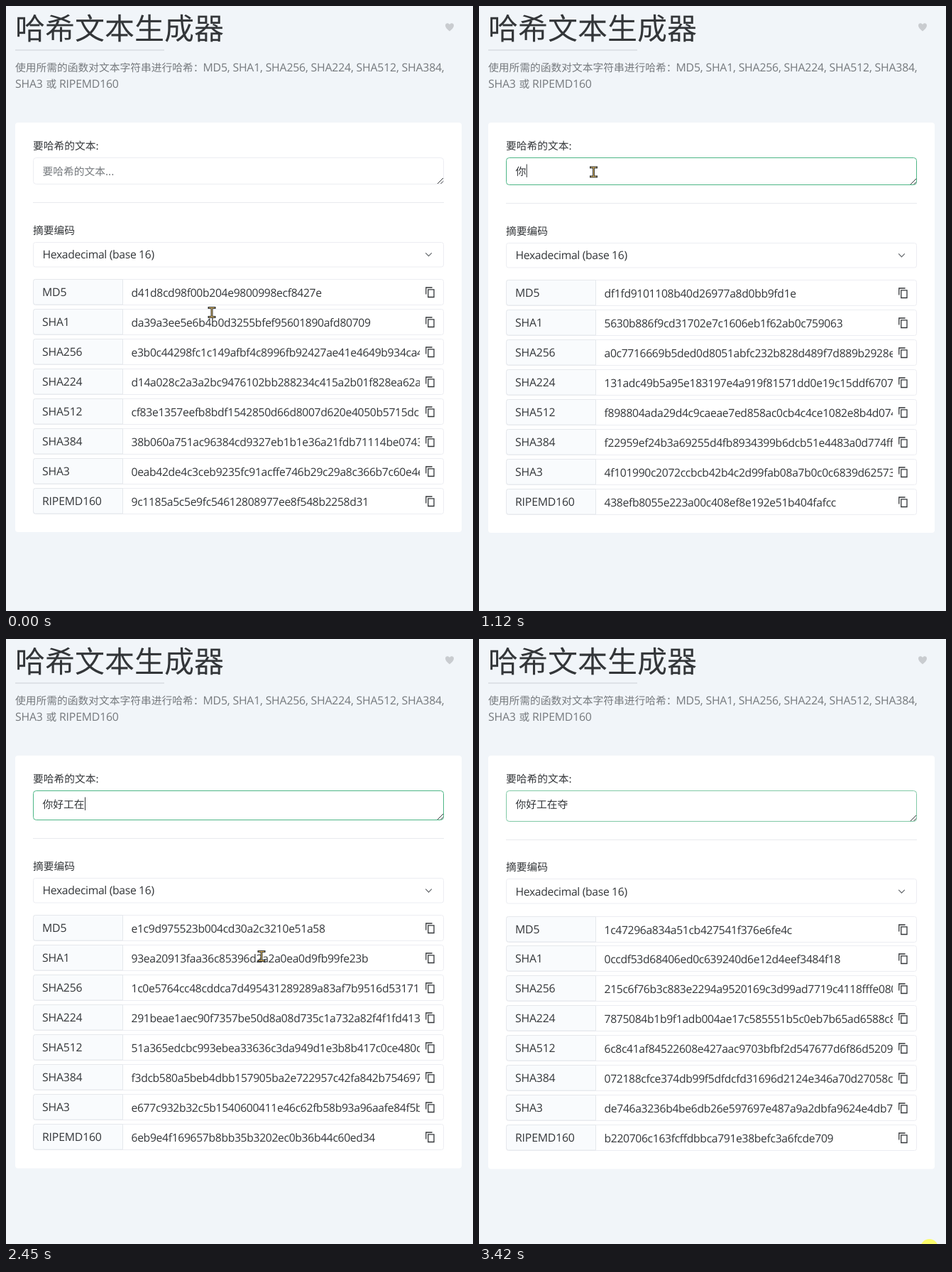
Recreate the animation shown at these times as an HTML page. Size 658x851 px, loop 3.46 s.

```html
<!DOCTYPE html>
<html lang="zh-CN">
<head>
<meta charset="utf-8">
<style>
html, body { margin: 0; width: 100%; height: 100%; overflow: hidden; background: #f1f5f9; }
svg { display: block; width: 658px; height: 851px; }
text { font: 15.7px "Open Sans", "Noto Sans", sans-serif; letter-spacing: -.33px; fill: #333639; white-space: pre; text-rendering: geometricPrecision; }
.caps { font-size: 15.8px; letter-spacing: -.18px; }
.cjk { font: 14.75px "Noto Sans CJK SC", "Noto Sans CJK", sans-serif; letter-spacing: 0; }
.title { font: 300 42px "Noto Sans CJK SC", "Noto Sans CJK", sans-serif; letter-spacing: 0; }
.grey { fill: #75797d; }
.line { fill: none; stroke: #333639; }
</style>
</head>
<body>
<svg id="stage" viewBox="0 0 658 851"></svg>
<script>
const LOOP = 3460;
const names = ['MD5', 'SHA1', 'SHA256', 'SHA224', 'SHA512', 'SHA384', 'SHA3', 'RIPEMD160'];
const typed = '你好工在夺';
const commits = [1120, 1660, 2120, 2440, 3280];

// Visible digests after 0 to 5 typed characters
const digests = [
  `d41d8cd98f00b204e9800998ecf8427e
   da39a3ee5e6b4b0d3255bfef95601890afd80709
   e3b0c44298fc1c149afbf4c8996fb92427ae41e4649b934ca4
   d14a028c2a3a2bc9476102bb288234c415a2b01f828ea62a
   cf83e1357eefb8bdf1542850d66d8007d620e4050b5715dc
   38b060a751ac96384cd9327eb1b1e36a21fdb71114be0743
   0eab42de4c3ceb9235fc91acffe746b29c29a8c366b7c60e4e
   9c1185a5c5e9fc54612808977ee8f548b2258d31`,
  `df1fd9101108b40d26977a8d0bb9fd1e
   5630b886f9cd31702e7c1606eb1f62ab0c759063
   a0c7716669b5ded0d8051abfc232b828d489f7d889b2928e
   131adc49b5a95e183197e4a919f81571dd0e19c15ddf6707
   f898804ada29d4c9caeae7ed858ac0cb4c4ce1082e8b4d074
   f22959ef24b3a69255d4fb8934399b6dcb51e4483a0d774ff
   4f101990c2072ccbcb42b4c2d99fab08a7b0c0c6839d62573
   438efb8055e223a00c408ef8e192e51b404fafcc`,
  `7eca689f0d3389d9dea66ae112e5cfd7
   440ee0853ad1e99f962b63e459ef992d7c211722
   670d9743542cae3ea7ebe36af56bd53648b0a1126162e78c
   e91f006ed4e0882de2f6a3c96ec228a6a5c715f356d00091b
   5232181bc0d9888f5c9746e410b4740eb461706ba5dacfbc
   05f076c7d180e91d80a56d70b226fca01e2353554c315ac1e
   690e4aec9334fc7c8bb0cdd203d0d132918088a02e8df882
   63b2385b306e6c9c96050aa08846471a90abb749`,
  `f535798baef7403816edcf6a75a1c368
   63c636553060fc40e66346e4f53af457e2489646
   d31594e5efad58231439e89faf68c684c4034caa0d85bd8e2
   9dc6aba08d4a502cdd9d6f870af054c441032a82e7f4f40b6
   c8943a4629908376aed21513008064d94c444b578fc93fd76
   34dbf25aeb6221364b9f78efbc9407dbb84e59c1e5e4e4407
   7611de69408d2b23a0242aaccf3fa45b2f14d73edd642f1d0
   77acb5efcda0a9d20a869eaef44cb993bc28d9fe`,
  `e1c9d975523b004cd30a2c3210e51a58
   93ea20913faa36c85396d2a2a0ea0d9fb99fe23b
   1c0e5764cc48cddca7d495431289289a83af7b9516d53171
   291beae1aec90f7357be50d8a08d735c1a732a82f4f1fd413
   51a365edcbc993ebea33636c3da949d1e3b8b417c0ce480c
   f3dcb580a5beb4dbb157905ba2e722957c42fa842b754697
   e677c932b32c5b1540600411e46c62fb58b93a96aafe84f5b
   6eb9e4f169657b8bb35b3202ec0b36b44c60ed34`,
  `1c47296a834a51cb427541f376e6fe4c
   0ccdf53d68406ed0c639240d6e12d4eef3484f18
   215c6f76b3c883e2294a9520169c3d99ad7719c4118fffe080
   7875084b1b9f1adb004ae17c585551b5c0eb7b65ad6588c8
   6c8c41af84522608e427aac9703bfbf2d547677d6f86d5209
   072188cfce374db99f5dfdcfd31696d2124e346a70d27058c
   de746a3236b4be6db26e597697e487a9a2dbfa9624e4db79
   b220706c163fcffdbbca791e38befc3a6fcde709`
].map(s => s.split(/\s+/));

// Input method window: start, end, right edge, pinyin, candidates
const popups = [
  [910, 1120, 366, 'ni', '你呢拟尼泥'],
  [1350, 1510, 356, 'h', '好和会还很'],
  [1510, 1660, 399, 'hao', '好号浩毫豪'],
  [1980, 2120, 453, 'gong', '工公共功宫'],
  [2240, 2440, 440, 'zai', '在再载灾仔'],
  [2980, 3280, 450, 'duo', '多夺朵躲堕']
];

// Pointer positions, each held until the next: time, x, y
const moves = [
  [0, 290, 431], [70, 284, 420], [145, 262, 386], [220, 228, 338], [295, 195, 286],
  [370, 172, 248], [445, 161.5, 233.5], [2300, 190, 262], [2370, 262, 338],
  [2440, 360, 446], [2500, 458, 556], [2560, 540, 640], [2620, 592, 694],
  [2700, 628, 738], [2760, 644, 759], [2820, 645, 790], [2900, 640, 826], [2980, 635, 857]
];

const snap = y => Math.floor(y) + .5;
const text = (x, y, s, cls = '') => `<text x="${x}" y="${y}" class="${cls}">${s}</text>`;
const box = (x, y, w, h, fill = '#fff', stroke = '#ecedf2', r = 3) =>
  `<rect x="${x}" y="${y}" width="${w}" height="${h}" rx="${r}" fill="${fill}" stroke="${stroke}"/>`;
const path = (d, w = 1.2, extra = '') => `<path class="line" d="${d}" stroke-width="${w}" ${extra}/>`;
const dot = (x, y) => `<circle cx="${x}" cy="${y}" r="12.5" fill="#ffff3c" fill-opacity=".75"/>`;

const header =
  text(13, 47, '哈希文本生成器', 'title') +
  '<path d="M13 62H223" stroke="#d9dde2" stroke-width="1.5"/>' +
  '<path d="M625 35.5C621 32 619 30 619 27.4C619 23.8 623.2 23 625 26C626.8 23 631 23.8 631 27.4C631 30 629 32 625 35.5Z" fill="#c9ccd0"/>' +
  text(13, 91.5, '使用所需的函数对文本字符串进行哈希：', 'cjk grey') +
  text(277.5, 91.5, names.slice(0, 6).join(', ') + ',', 'caps grey') +
  text(13, 115, 'SHA3', 'caps grey') + text(56.5, 115, '或', 'cjk grey') +
  text(75, 115, 'RIPEMD160', 'caps grey') +
  '<clipPath id="field"><path d="M170 370H583V740H170Z"/></clipPath>';

function row(name, digest, y) {
  return box(38.5, y, 578, 36) +
    `<path d="M164.5 ${y}H41.5a3 3 0 0 0-3 3v29.5a3 3 0 0 0 3 3H164.5Z" fill="#f9fbfd" stroke="#e5e8ec"/>` +
    text(51, y + 23, name, 'caps') +
    `<g clip-path="url(#field)">${text(176.5, y + 24, digest)}</g>` +
    path(`M591.8 ${y + 21}v-9.5h8.8M594.8 ${y + 14.3}h8.2v10.7h-8.2Z`, 1.3);
}

function popup([, , right, pinyin, words], x) {
  const list = [...words].map((w, i) => `${i + 1}.${w}`).join('  ');
  return box(x + .5, 242.5, right - x - 1, 49, '#fff', '#d5d8dc', 2) +
    text(x + 7, 259, pinyin) + text(x + 7, 283, list, 'cjk');
}

function pointer(x, y) {
  if (y > 720) return `<path transform="translate(${x} ${y})" d="M.5 .5V14.5L3.8 11.6L6 16.5L8.4 15.4L6.2 10.7H10.6Z" fill="#fc1" stroke="#222" stroke-width="1.2"/>`;
  const d = `M${x - 4} ${y - 6.5}h8M${x} ${y - 6.5}v13M${x - 4} ${y + 6.5}h8`;
  return path(d, 3, 'stroke-linecap="square"') + `<path d="${d}" stroke="#e0b860" stroke-width="1"/>`;
}

function borderAt(t) {
  if (t < 520) return '#ecedf2';
  if (t < 590) return '#9fd5ba';
  return t < 3280 ? '#4db686' : t < 3420 ? '#5abb8d' : '#80c9a6';
}

function scene(t) {
  const n = commits.filter(c => t >= c).length;
  const ime = popups.find(p => t >= p[0] && t < p[1]);
  const caret = 52.5 + 14.75 * n;
  const grow = 1.1 * n; // the text area gets taller with each character
  const bottom = 251 + Math.round(grow);
  const [, mx, my] = moves.findLast(m => t >= m[0]);
  let s = header + box(13, 164, 629, 576 + grow, '#fff', 'none', 4) +
    text(38, 202, '要哈希的文本:', 'cjk') +
    box(38.5, 213.5, 578, bottom - 214, '#fff', borderAt(t), 4) +
    path(`M608 ${bottom - 1}l8-8M612.5 ${bottom - 1}l3.5-3.5`, 1);
  if (n) s += text(51.5, 237.5, typed.slice(0, n), 'cjk');
  else if (!ime) s += text(51.5, 237.5, '要哈希的文本...', 'cjk grey');

  s += `<path d="M38 ${snap(276.5 + grow)}H617" stroke="#e8eaee"/>` +
    text(38, 320.5 + grow, '摘要编码', 'cjk') + box(38.5, snap(332 + grow), 578, 34.5) +
    text(51.5, 355 + grow, 'Hexadecimal (base 16)') +
    path(`M591.2 ${347.3 + grow}l4.3 4.4l4.3-4.4`, 1.2, 'style="stroke:#62666a"') +
    names.map((name, i) => row(name, digests[n][i], snap(384.5 + grow + i * 41.95))).join('');

  if (t >= 2700 && t < 2980) s += path('M111 240.5H115M115 222.5V241', 1);
  else if (t >= 520 && t < 2980 && !ime) s += path(`M${caret} 222.5V241`, 1);
  if (ime) s += popup(ime, Math.floor(caret));
  if (t >= 520 && t < 680) s += dot(161.5, 234);
  if (t >= 3280) s += dot(634.5, 856.5);
  return s + pointer(mx, my);
}

const stage = document.getElementById('stage');
let last = '';
function draw() {
  const next = scene(performance.now() % LOOP);
  if (next !== last) stage.innerHTML = last = next;
  requestAnimationFrame(draw);
}
draw();
</script>
</body>
</html>
```
